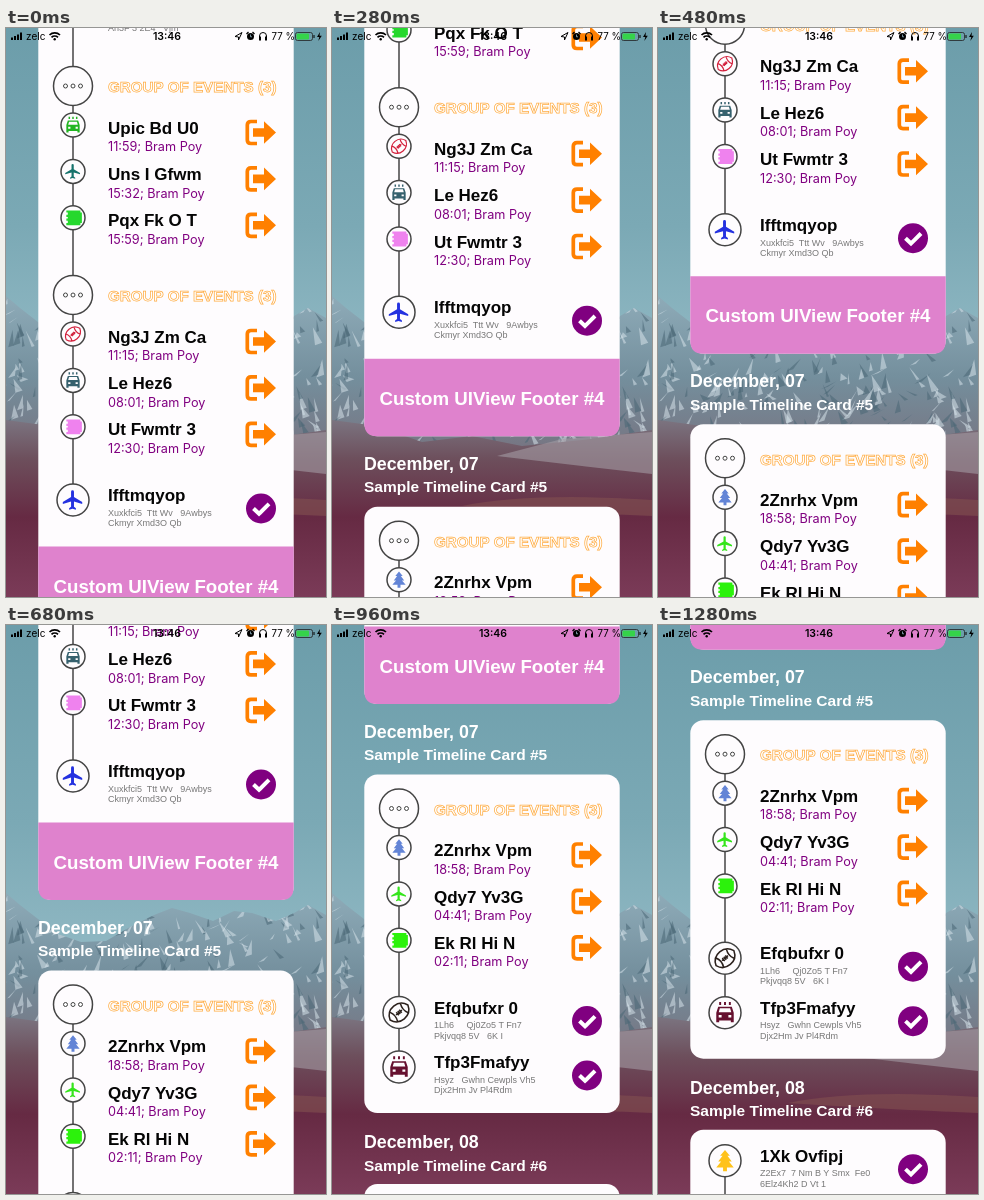
Write an HTML page that moves like this. It is 320 px wide and 569 px high and loops after 1320 ms.

```html
<!DOCTYPE html>
<html lang="en">
<head>
<meta charset="utf-8">
<title>Timeline cards</title>
<style>
html, body { margin: 0; width: 100%; height: 100%; overflow: hidden; }
svg { display: block; width: 320px; height: 569px; }
text { font-family: "Liberation Sans", Arial, sans-serif; white-space: pre; }
.footer { font-size: 18.7px; font-weight: 700; fill: #fff; text-anchor: middle; }
.date { font-size: 17.8px; font-weight: 700; fill: #fff; }
.card { font-size: 15.5px; font-weight: 700; fill: #fff; }
.title { font-size: 17px; font-weight: 700; fill: #050505; }
.sub { font: 12.7px Inter, sans-serif; fill: #800080; }
.note { font-size: 9px; fill: #777; }
.group { font-size: 15.2px; font-weight: 700; fill: #fff; stroke: #ffab40; stroke-width: .75; }
.ring { fill: #fefcfe; stroke: #444; stroke-width: 1.5; }
#status text { font: 10px Inter, sans-serif; }
</style>
</head>
<body>
<svg viewBox="0 0 320 569">
  <defs>
    <linearGradient id="sky" x2="0" y2="1">
      <stop offset="0" stop-color="#6c9daa"/><stop offset=".6" stop-color="#7ba9b5"/><stop offset="1" stop-color="#90b8c3"/>
    </linearGradient>
    <linearGradient id="rock" x2="0" y2="1">
      <stop offset="0" stop-color="#8eabb8"/><stop offset=".5" stop-color="#748f9d"/><stop offset="1" stop-color="#77727f"/>
    </linearGradient>
    <linearGradient id="land" x2="0" y2="1">
      <stop offset="0" stop-color="#7b7480"/><stop offset=".22" stop-color="#6d4f5c"/>
      <stop offset=".55" stop-color="#662a43"/><stop offset="1" stop-color="#7b3b58"/>
    </linearGradient>
    <path id="ridge" d="M0 268L14 280 32 294 52 309 75 317 100 316 124 302 148 290 166 283 184 288 207 296 228 286 246 288 270 296 288 288 302 280 320 290V430H0z"/>
    <clipPath id="slopes"><use href="#ridge"/></clipPath>
  </defs>
  <rect width="320" height="330" fill="url(#sky)"/>
  <use href="#ridge" fill="url(#rock)"/>
  <g id="snow" clip-path="url(#slopes)"></g>
  <path d="M0 392L45 398 90 414 140 408 190 418 250 412 320 402V569H0z" fill="url(#land)"/>
  <path d="M165 428L230 411 320 404V446L250 438z" fill="#a39ba3" opacity=".6"/>
  <path d="M130 478Q200 464 320 472V488Q220 484 130 478z" fill="#835150" opacity=".6"/>
  <g id="content"></g>
  <g id="status">
    <path d="M5 9.5h2V12H5zM8 8h2v4H8zM11 6.5h2V12h-2zM14 4.5h2V12h-2z"/>
    <text x="20" y="12">zelc</text>
    <path d="M43.5 7a7.5 7.5 0 0 1 10.5 0M45.5 9.3a4.8 4.8 0 0 1 6.5 0" fill="none" stroke="#000" stroke-width="1.7"/>
    <circle cx="48.7" cy="11.3" r="1.2"/>
    <text x="161" y="12" text-anchor="middle" style="font-size:10.5px;font-weight:600">13:46</text>
    <path d="M229 8.5L236 4.5 232.5 12V9z" fill="none" stroke="#000"/>
    <circle cx="244.5" cy="8.5" r="3.5"/>
    <path d="M240.5 6l2-2M248.5 6l-2-2" stroke="#000" stroke-width="1.3"/>
    <path d="M244.5 6.5v2.3h1.5" fill="none" stroke="#9bc" stroke-width=".8"/>
    <path d="M253.5 9.5V8a3.500 3.500 0 0 1 7 0v1.500" fill="none" stroke="#000"/>
    <path d="M253 8.5h2v4h-2zM259 8.5h2v4h-2z"/>
    <text x="265.5" y="12" style="font-size:9.7px">77 %</text>
    <rect x="289.5" y="4.5" width="17" height="8" rx="2" fill="none" stroke="#222" stroke-width=".8"/>
    <rect x="290.5" y="5.5" width="12.5" height="6" rx="1" fill="#35d34a"/>
    <path d="M307.5 7v3h1V7zM314 4l-3 5h2.3l-1 4 3.500-5.300h-2.300z"/>
  </g>
</svg>
<script>
const $ = id => document.getElementById(id);

const text = (cls, x, y, s) => `<text class="${cls}" x="${x}" y="${y}">${s}</text>`;
const ring = (y, r) => `<circle class="ring" cx="67" cy="${y}" r="${r}"/>`;
const line = (y1, y2) => `<path d="M67 ${y1}V${y2}" stroke="#444" stroke-width="1.5"/>`;
const at = (x, y, body, scale = 1) => `<g transform="translate(${x} ${y}) scale(${scale})">${body}</g>`;
const panel = (y, bottom) => `<rect x="32.3" y="${y}" width="255.4" height="${bottom - y}" rx="13" fill="#fefcfe"/>`;

// Icons live in a box from -12 to 12
const shapes = {
  plane: 'M9.5 4V2L1-3V-8.5Q1-10-.5-10T-2-8.5V-3L-10.5 2V4L-2 1.5V7L-4 8.5V10L-.5 9 3 10V8.5L1 7V1.5z',
  car: 'M-9 0l2-6H7l2 6V10H6V8H-6v2h-3zM-6.5-.5h13L5.3-4.5H-5.3zM-6.5 2.5V5h3V2.5zM3.5 2.5V5h3V2.5zM-6-11h2v3h-2zM-1-11h2v3h-2zM4-11h2v3h-2z',
  book: 'M-9-10H10v3h2V7h-2v3H-9V7h2V4h-2V1h2v-2h-2v-3h2v-3h-2z',
  tree: 'M0-11l5 6H2.5L7 1H4l5 6H2v4h-4V7h-7l5-6h-3l4.5-6H-5z',
};
const ball = color => `<g transform="rotate(-40)" fill="none" stroke="${color}" stroke-width="1.6">
  <path d="M-12 0Q-9-8.500 0-8.500T12 0Q9 8.500 0 8.500T-12 0zM-7-6Q-4 0-7 6M7-6Q4 0 7 6M-4 0H4M-2-2V2M0-2V2M2-2V2"/></g>`;
const icon = (kind, color) => kind === 'ball' ? ball(color)
  : `<path d="${shapes[kind]}" fill="${color}" fill-rule="evenodd"/>`;

const exitArrow = `<path d="M-4-11H-10Q-13.7-11-13.7-7.5V7.5Q-13.7 11-10 11H-4" fill="none" stroke="#ff8000" stroke-width="3.7"/>
  <path d="M-8-4.3H3V-11.3L15 0 3 11.3V4.3H-8z" fill="#ff8000"/>`;
const check = `<circle r="15" fill="#800080"/><path d="M-7.5 0L-2 5.3 8-4.7" fill="none" stroke="#fff" stroke-width="4"/>`;

function group(y, rows) {
  const dots = [-7.5, 0, 7.5].map(x => `<circle cx="${x}" r="2" fill="#fff" stroke="#444"/>`).join('');
  return ring(y, 19.5) + at(67, y, dots) + text('group', 102, y + 6.3, 'GROUP OF EVENTS (3)') +
    rows.map(([kind, color, title, time], i) => {
      const cy = y + 39 + 46.4 * i;
      return ring(cy, 12) + at(67, cy, icon(kind, color), .74) +
        text('title', 102, cy + 8.6, title) +
        text('sub', 102, cy + 26.1, time + '; Bram Poy') +
        at(255, cy + 7.5, exitArrow);
    }).join('');
}

function single(y, kind, color, title, note1, note2) {
  return ring(y, 16) + at(67, y, icon(kind, color), .97) + text('title', 102, y + 1.3, title) +
    text('note', 102, y + 15.8, note1) + text('note', 102, y + 26.3, note2) + at(255, y + 8.5, check);
}

const heading = (y, day, n) =>
  text('date', 32, y, 'December, ' + day) + text('card', 32, y + 22.7, 'Sample Timeline Card #' + n);

$('content').innerHTML =
  panel(-120, 596) +
  '<path d="M32.3 518.5H287.700V583Q287.700 596 275 596H45Q32.300 596 32.300 583z" fill="#df82cd"/>' +
  text('footer', 160, 564.5, 'Custom UIView Footer #4') +
  line(-60, 472) +
  text('note', 102, 3, 'Ah3F 3 2E4   Vjm') +
  group(58, [
    ['car', '#22b522', 'Upic Bd U0', '11:59'],
    ['plane', '#16736c', 'Uns I Gfwm', '15:32'],
    ['book', '#25d82d', 'Pqx Fk O T', '15:59']]) +
  group(267, [
    ['ball', '#d3203c', 'Ng3J Zm Ca', '11:15'],
    ['car', '#36616e', 'Le Hez6', '08:01'],
    ['book', '#ef82ee', 'Ut Fwmtr 3', '12:30']]) +
  single(472, 'plane', '#2431e0', 'Ifftmqyop', 'Xuxkfci5  Ttt Wv   9Awbys', 'Ckmyr Xmd3O Qb') +

  heading(629.5, '07', 5) + panel(666.5, 1005) + line(700.5, 959) +
  group(700.5, [
    ['tree', '#6384d6', '2Znrhx Vpm', '18:58'],
    ['plane', '#35e51c', 'Qdy7 Yv3G', '04:41'],
    ['book', '#2cf20c', 'Ek Rl Hi N', '02:11']]) +
  single(904.5, 'ball', '#2b201c', 'Efqbufxr 0', '1Lh6     Qj0Zo5 T Fn7', 'Pkjvqq8 5V   6K I') +
  single(959, 'car', '#66102f', 'Tfp3Fmafyy', 'Hsyz   Gwhn Cewpls Vh5', 'Djx2Hm Jv Pl4Rdm') +

  heading(1040, '08', 6) + panel(1076, 1300) + line(1107, 1290) +
  single(1107, 'tree', '#ffc21a', '1Xk Ovfipj', 'Z2Ex7  7 Nm B Y Smx  Fe0', '6Elz4Kh2 D Vt 1');

// Small snow and shadow facets that run down the slopes
let seed = 7;
const rand = () => (seed = seed * 16807 % 2147483647) / 2147483647;
$('snow').innerHTML = Array.from({ length: 260 }, (_, i) => {
  const x = rand() * 320, y = 270 + rand() * 140;
  const w = (rand() - .4) * 22, h = 4 + rand() * 12, cut = 2 + rand() * 6;
  return `<path d="M${x} ${y}l${w} ${h}l${-cut} ${cut / 3}z" fill="${i % 5 < 3 ? '#d5e2e9' : '#4a6676'}" opacity=".55"/>`;
}).join('');

// A coasting flick, then a second drag that settles
function scrollAt(t) {
  if (t <= 680) return Math.min(321, 438 * (1 - Math.exp(-t / 500)));
  if (t > 960) return 574.4 - 57.4 * Math.exp((960 - t) / 109);
  const p = (t - 680) / 280;
  return 321 + p * (42 + p * (356 - 202 * p));
}

function draw() {
  const t = Math.floor(performance.now() % 1320 / 40) * 40;
  $('content').setAttribute('transform', `translate(0 ${-scrollAt(t)})`);
  requestAnimationFrame(draw);
}
draw();
</script>
</body>
</html>
```
